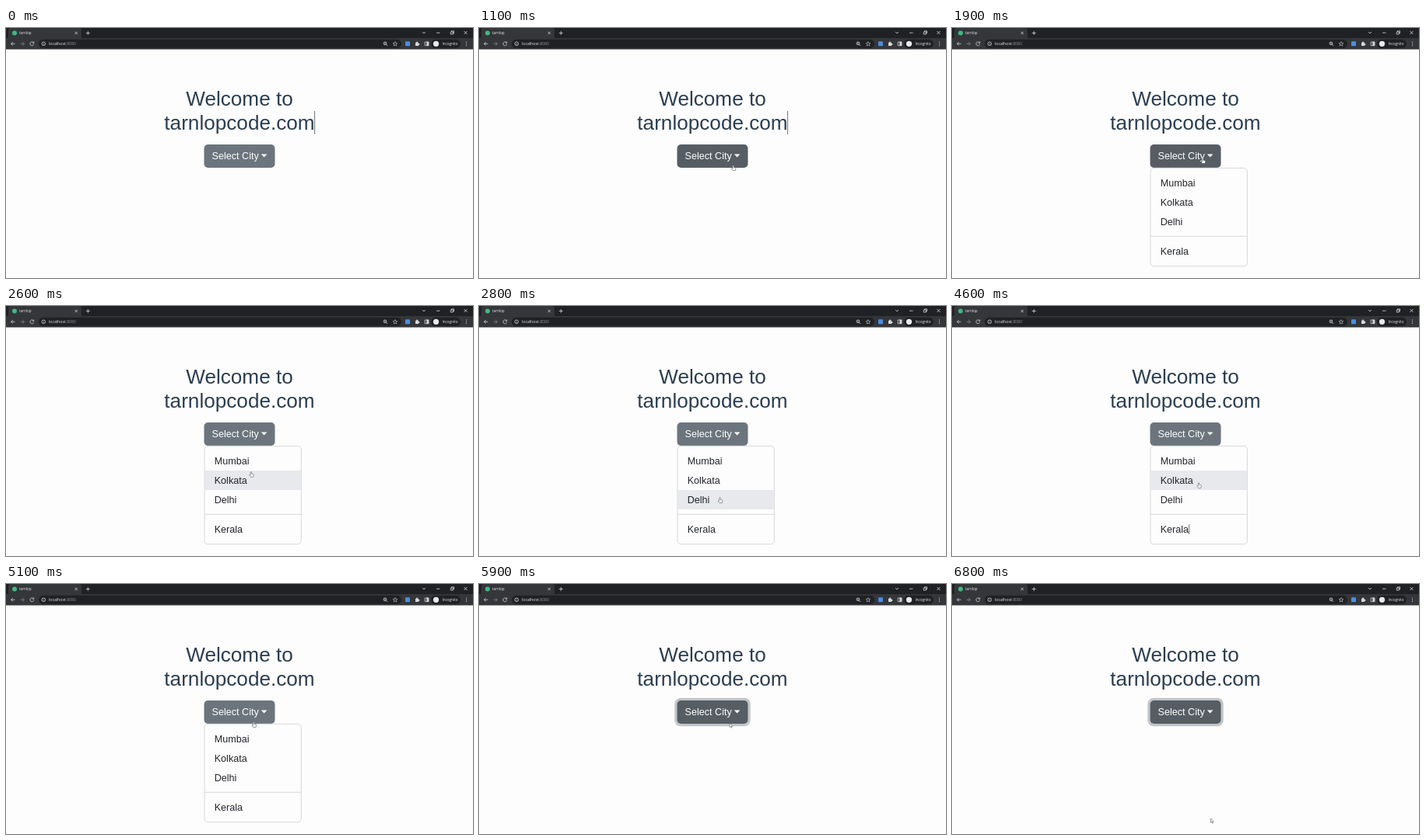
Write an HTML page that moves like this. It is 600 by 322 pixels and loops after 7100 ms.

```html
<!DOCTYPE html>
<html lang="en">
<head>
<meta charset="utf-8">
<title>City dropdown</title>
<style>
  html, body { margin: 0; width: 100%; height: 100%; overflow: hidden; background: #fefdfe; }
  svg { display: block; width: 600px; height: 322px; }
  .page { font-family: "Liberation Sans", Arial, sans-serif; font-size: 12.6px; fill: #212529; }
  .title { font-size: 26.15px; fill: #2c3e50; text-anchor: middle; }
  .ui { font-family: "Open Sans", "Noto Sans", sans-serif; font-size: 4.6px; fill: #e8eaed; }
  .icons { fill: none; stroke: #d5d7da; stroke-width: .8; }
  .caret { stroke: #4a5058; stroke-width: .8; }
</style>
</head>
<body>
<svg viewBox="0 0 600 322">
  <rect width="600" height="322" fill="#fefdfe"/>

  <!-- browser bar -->
  <rect width="600" height="27.5" fill="#35363a"/>
  <rect width="600" height="13" fill="#202124"/>
  <path d="M1 13.5Q3 13 3 11V3Q3 0 6 0H94Q97 0 97 3V11Q97 13 99 13.5Z" fill="#35363a"/>
  <rect x="42" y="14.8" width="466" height="11" rx="5.5" fill="#202124"/>
  <rect x="546" y="14.8" width="38" height="11" rx="5.5" fill="#202124"/>
  <circle cx="11" cy="6.4" r="3" fill="#41b883"/>
  <rect x="513" y="17.3" width="6" height="6" rx="1" fill="#4a8fe0"/>
  <circle cx="552.5" cy="20.3" r="3.6" fill="#e8eaed"/>
  <g class="icons">
    <path d="M88.5 4.8l3.4 3.4m0-3.4l-3.4 3.4M102.8 6.5h5m-2.5-2.5v5"/>
    <path d="M535 5l2 2 2-2M553 6.2h4.5M571.3 5h3v3h-3zM572.5 5V3.8h3v3h-1.2M588.5 4l4 4m0-4l-4 4"/>
    <path d="M11.5 20.3h-5m2.3-2.3l-2.3 2.3 2.3 2.3"/>
    <path d="M18.5 20.3h5m-2.3-2.3l2.3 2.3-2.3 2.3" stroke="#85888c"/>
    <path d="M35.2 18.8a2.4 2.4 0 1 0 .5 2M35.8 17.5v1.8h-1.8"/>
    <circle cx="48.3" cy="20.3" r="2.3"/>
    <path d="M48.3 20v1.6m0-2.9v.6" stroke-width=".6"/>
    <circle cx="487" cy="19.8" r="1.9"/>
    <path d="M488.4 21.2l1.8 1.8M486 19.8h2"/>
    <path d="M500 17.6l.8 1.8 2 .2-1.5 1.3.5 2-1.8-1-1.8 1 .5-2-1.5-1.3 2-.2z" stroke-width=".6"/>
    <path d="M526 18.8h1.2a.9.9 0 1 1 1.7 0h1.2v1.3a.9.9 0 1 1 0 1.6V23H526z" fill="#d5d7da" stroke="none"/>
    <path d="M538.2 18h4.6v4.6h-4.6z"/>
    <path d="M540.8 18h2v4.6h-2z" fill="#d5d7da"/>
    <path d="M591.5 17.6v1m0 1.2v1m0 1.2v1" stroke-width="1"/>
  </g>
  <g class="ui">
    <text x="17" y="8.2">tarnlop</text>
    <text x="55" y="22.2" font-size="5.2">localhost<tspan fill="#8f9296">:8080</tspan></text>
    <text x="560.5" y="22">Incognito</text>
  </g>

  <!-- page -->
  <g class="page">
    <g class="title">
      <text x="300" y="99.6">Welcome to</text>
      <text x="300" y="131.2">tarnlopcode.com</text>
    </g>
    <path id="titleCaret" class="caret" d="M396.6 107V137"/>
    <rect id="ring" x="253" y="148.5" width="94" height="33" rx="6" fill="none" stroke="#c1c5c9" stroke-width="3.4"/>
    <rect id="button" x="254.5" y="150" width="91" height="30" rx="5"/>
    <text x="264.6" y="169.4" fill="#fff">Select City</text>
    <path d="M327.8 162.5h7.6l-3.8 3.9z" fill="#fff"/>
    <g id="menu">
      <rect x="255" y="180.3" width="124.3" height="126.5" rx="4.5" fill="#fefdfe" stroke="#d6d5d9"/>
      <rect id="hover" x="255.5" width="123.3" height="25" fill="#e7e9ed"/>
      <path d="M255 268.3H379" stroke="#d9d8dc"/>
      <g id="items"></g>
      <path id="itemCaret" class="caret" d="M304.6 281V294"/>
    </g>
  </g>

  <g id="cursor" stroke="#55585c" stroke-width=".6" stroke-linejoin="round" fill="#fff">
    <path id="arrow" d="M0 0V5.4L1.3 4.3 2.2 6.2 3 5.8 2.1 4H3.8Z"/>
    <path id="hand" d="M-.7 .6Q0-.5 .7 .6V2.8L2.8 3.3Q3.5 3.6 3.3 4.5L2.7 7H-.6L-2.3 4.5Q-2.2 3.5-.7 4.4Z"/>
  </g>
</svg>
<script>
const LOOP = 7100, OPEN = 1900, CLOSE = 5800;
const $ = id => document.getElementById(id);
const show = (id, on) => $(id).style.display = on ? "" : "none";

// label and top of each row
const rows = [["Mumbai", 187], ["Kolkata", 212], ["Delhi", 237], ["Kerala", 275]];
$("items").innerHTML = rows.map(([name, y]) => `<text x="267.7" y="${y + 16.9}">${name}</text>`).join("");

// pointer tip: time, x, y
const path = [
  [500, 385, 150], [700, 362, 211], [900, 336, 194], [1200, 322, 168], [1300, 322.3, 167.5],
  [2300, 322.3, 167.5], [2500, 319, 188], [2600, 315, 213], [2700, 311, 235], [2800, 309.5, 246.5],
  [3000, 309.5, 261], [3100, 310, 267], [3200, 311.5, 276], [3700, 313, 281.3],
  [4100, 313, 281.3], [4300, 315, 265], [4500, 317, 239], [4600, 317, 227.5], [4900, 318, 200],
  [5100, 318.3, 177.6], [5300, 319, 170], [5500, 320, 166], [5800, 320, 166],
  [6000, 324, 192], [6300, 328, 255], [6500, 329, 280], [6600, 330.5, 289], [6800, 332.5, 302]
];

function pointer(t) {
  const i = path.findIndex(p => p[0] > t);
  if (i < 0) return path.at(-1).slice(1);
  const [t0, x0, y0] = path[i - 1], [t1, x1, y1] = path[i];
  const k = (t - t0) / (t1 - t0);
  return [x0 + (x1 - x0) * k, y0 + (y1 - y0) * k];
}

function draw(t) {
  const moving = t >= 500, open = t >= OPEN && t < CLOSE, closed = t >= CLOSE;
  const [x, y] = moving ? pointer(t) : [0, 0];
  const onButton = x > 254 && x < 346 && y > 150 && y < 177;
  const row = open && rows.find(r => y >= r[1] && y < r[1] + 25);
  const blink = Math.floor((t + 90) / 530) % 2 === 0;

  show("titleCaret", blink && t < OPEN);
  show("itemCaret", blink);
  show("menu", open);
  show("ring", closed);
  show("hover", row);
  if (row) $("hover").setAttribute("y", row[1]);
  $("button").setAttribute("fill", onButton || closed ? "#565e64" : "#6c757d");

  const hand = onButton || row || (open && y < 180);
  show("cursor", moving);
  show("hand", hand);
  show("arrow", !hand);
  $("cursor").setAttribute("transform", `translate(${x} ${y})`);
}

function tick() {
  draw(performance.now() % LOOP);
  requestAnimationFrame(tick);
}
tick();
</script>
</body>
</html>
```
